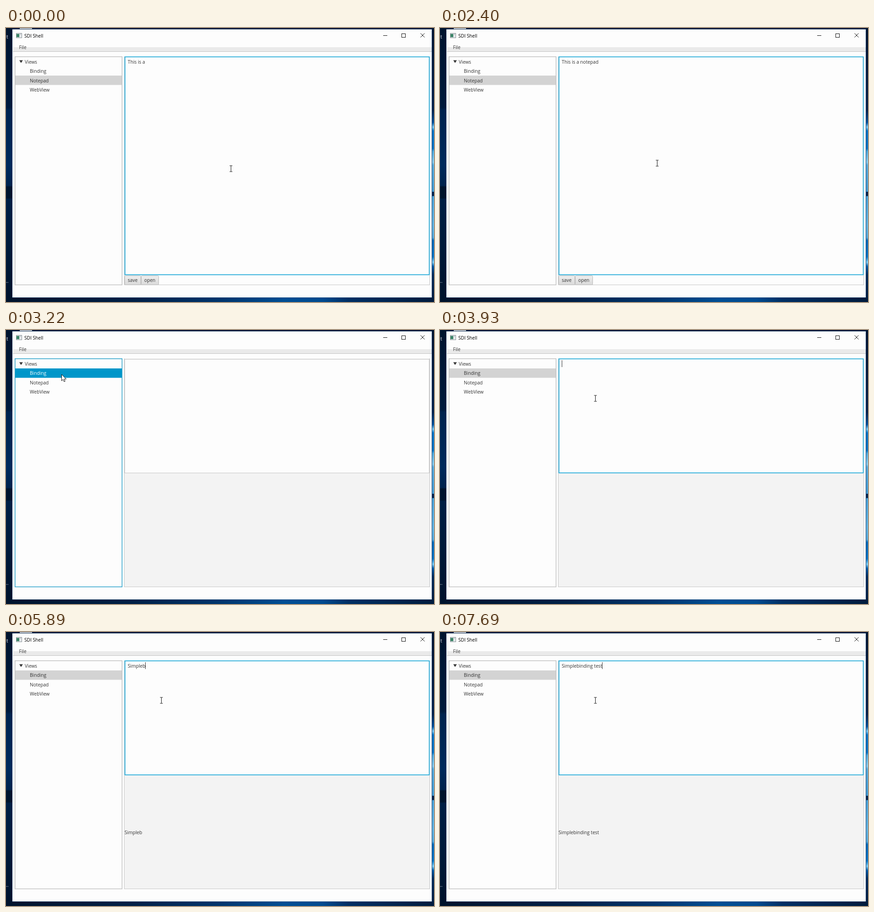
Write an HTML page with a canvas that moves like this. It is 935 px wide and 599 px high and loops after 8000 ms.

```html
<!DOCTYPE html>
<html lang="en">
<head>
<meta charset="utf-8">
<title>SDI Shell</title>
<style>
html, body { margin: 0; width: 100%; height: 100%; overflow: hidden; background: #001a3a; }
canvas { display: block; width: 935px; height: 599px; }
</style>
</head>
<body>
<canvas id="stage"></canvas>
<script>
const W = 935, H = 599, LOOP = 8000;
const FONT = '10.2px "Open Sans", "Noto Sans", sans-serif';
const WHITE = '#fdfdfd', INK = '#333', GREY = '#c6c6c6', ACCENT = '#039ed3';
const canvas = document.getElementById('stage');
const ctx = canvas.getContext('2d');
const dpr = window.devicePixelRatio || 1;
canvas.width = W * dpr;
canvas.height = H * dpr;
ctx.scale(dpr, dpr);

// Each entry: start time, typed text, caret visible
const typing = [
  [0, 'This is a ', false], [150, 'This is a ', true], [580, 'This is a ', false],
  [990, 'This is a ', true], [1140, 'This is a n', true], [1280, 'This is a no', true],
  [1420, 'This is a note', true], [1700, 'This is a notepa', true],
  [1840, 'This is a notepad', true], [2400, 'This is a notepad', false],
  [2820, 'This is a notepad', true], [3220, '', false], [3930, '', true],
  [4460, '', false], [4600, 'Si', true], [4730, 'Sim', true],
  [5010, 'Simpl', true], [5150, 'Simple', true], [5750, 'Simple', false],
  [5890, 'Simpleb', true], [6320, 'Simplebi', true], [6450, 'Simplebin', true],
  [7000, 'Simplebin', false], [7140, 'Simplebind', true], [7280, 'Simplebindin', true],
  [7410, 'Simplebinding', true], [7550, 'Simplebinding te', true],
  [7690, 'Simplebinding test', true]
];

// Each entry: start time, pointer x, y
const pointer = [
  [0, 491, 307], [2400, 474, 295], [2540, 400, 246], [2680, 288, 172],
  [2820, 188, 116], [2960, 132, 100], [3100, 121, 97],
  [3500, 150, 106], [3640, 256, 136], [3780, 339, 149.5]
];

const current = (list, t) => list.filter(e => e[0] <= t).pop();

function rect(x, y, w, h, fill) {
  ctx.fillStyle = fill;
  ctx.fillRect(x, y, w, h);
}

function frame(x, y, w, h, color, line = 1) {
  ctx.strokeStyle = color;
  ctx.lineWidth = line;
  ctx.strokeRect(x, y, w, h);
}

function path(points, close) {
  ctx.beginPath();
  points.forEach(([x, y]) => ctx.lineTo(x, y));
  if (close) ctx.closePath();
}

function lines(color, ...segments) {
  ctx.strokeStyle = color;
  ctx.lineWidth = 1;
  for (const [x1, y1, x2, y2] of segments) {
    path([[x1, y1], [x2, y2]]);
    ctx.stroke();
  }
}

function text(s, x, y, color = INK) {
  ctx.font = FONT;
  ctx.fillStyle = color;
  ctx.fillText(s, x, y);
}

function gradient(x1, y1, x2, y2, stops) {
  const g = ctx.createLinearGradient(x1, y1, x2, y2);
  stops.forEach(([at, color]) => g.addColorStop(at, color));
  return g;
}

function drawDesktop() {
  rect(0, 0, W, H, '#001a3a');
  rect(0, 0, 14, H, gradient(0, 0, 0, H, [
    [0, '#00142e'], [0.29, '#001a3c'], [0.3, '#00234e'], [0.5, '#002a5c'],
    [0.575, '#00234d'], [0.58, '#00142d'], [0.62, '#00142d'], [0.625, '#001f45'],
    [0.8, '#001a3a'], [1, '#00122b']
  ]));
  rect(30, 0, 27, 2, '#c9ccd2');
  rect(0, 589, W, 10, gradient(0, 0, W, 0, [
    [0, '#00132c'], [0.3, '#002047'], [0.5, '#00356d'], [0.65, '#004e94'],
    [0.74, '#004a8f'], [0.8, '#002f64'], [1, '#001b3d']
  ]));
  rect(931, 0, 4, H, gradient(0, 0, 0, H, [
    [0, '#00142f'], [0.3, '#00204a'], [0.345, '#00509c'], [0.362, '#7ccbf5'],
    [0.375, '#0873c4'], [0.44, '#0873c4'], [0.45, '#4fa9dd'], [0.49, '#8acbed'],
    [0.5, '#58aadb'], [0.597, '#459bd2'], [0.598, '#00234d'], [0.613, '#00234d'],
    [0.614, '#4ba2d8'], [0.72, '#64b3e0'], [0.765, '#58aadb'], [0.775, '#0869b7'],
    [0.835, '#0873c4'], [0.855, '#83d0f7'], [0.87, '#005aa8'], [0.9, '#002a5a'],
    [1, '#001a3b']
  ]));
  text('t', 1, 23, '#e8edf4');
  text('..', 0, 557, '#e8edf4');
}

function drawWindow() {
  rect(13.5, 2.5, 917.5, 587, '#14406f');
  rect(14, 3, 916, 586, WHITE);

  rect(22, 11, 13, 11, '#8f979c');
  rect(23, 12, 11, 9, '#e3e7e9');
  rect(23, 13, 6, 7, '#3b8467');
  rect(30, 13, 3, 1, '#9aa2a8');
  text('SDI Shell', 40, 20.5, '#000');

  lines('#111', [824, 16.5, 833, 16.5], [905.5, 11.5, 914.5, 20.5], [914.5, 11.5, 905.5, 20.5]);
  frame(864.5, 12.5, 8, 8, '#111');

  rect(15, 42, 915, 9, '#eaeaea');
  rect(15, 51, 915, 1, '#c2c2c2');
  text('File', 28.5, 45.5);
}

function drawTree(selected, focused) {
  rect(19, 62, 235, 500, WHITE);
  const row = 84 + 20.5 * selected;
  rect(20, Math.floor(row), 233, 20.5, focused ? '#0096c9' : '#d3d3d3');
  frame(19.75, 62.75, 233.75, 498.75, focused ? '#28a1c9' : '#c2c2c2', 1.5);
  ctx.fillStyle = INK;
  path([[29, 70.5], [36.8, 70.5], [32.9, 76.5]], true);
  ctx.fill();
  text('Views', 41, 77.5);
  ['Binding', 'Notepad', 'WebView'].forEach((name, i) =>
    text(name, 52, 98 + 20.5 * i, focused && i === selected ? '#fff' : INK));
}

function drawArea(bottom, focused) {
  rect(259, 62, 666, bottom - 62, WHITE);
  if (focused) {
    frame(259.75, 63, 665, bottom - 63.5, '#8fd3eb', 2);
    frame(260, 63.25, 664.5, bottom - 64, ACCENT, 1.1);
  } else {
    frame(259.5, 63.5, 665, bottom - 64, GREY);
    rect(260, 64, 664, 1, '#e6e6e6');
  }
}

function drawButton(label, x, w, textX) {
  ctx.beginPath();
  ctx.roundRect(x + 0.5, 541.5, w - 1, 20, 2);
  ctx.fillStyle = gradient(0, 541, 0, 562, [[0, '#efefef'], [1, '#d9d9d9']]);
  ctx.fill();
  ctx.strokeStyle = '#b9b9b9';
  ctx.lineWidth = 1;
  ctx.stroke();
  text(label, textX, 554.5);
}

function drawContent(binding, focused, typed, caret) {
  rect(258, 62, 668, 500, binding ? '#f3f3f3' : WHITE);
  frame(258.5, 62.5, 667, 499, GREY);
  drawArea(binding ? 313 : 540, focused);
  text(typed, 266, 77.5);
  if (caret) {
    const x = Math.round(266 + ctx.measureText(typed).width - 0.4);
    rect(x, 66, 1, 15, '#333');
  }
  if (binding) {
    text(typed, 259, 441.5);
  } else {
    drawButton('save', 259, 36, 266);
    drawButton('open', 295, 39, 302);
  }
}

function drawBeam(x, y) {
  lines('#111',
    [x, y - 6, x, y + 6],
    [x - 3, y - 6.5, x + 3, y - 6.5],
    [x - 3, y + 6.5, x + 3, y + 6.5]);
}

function drawArrow(x, y) {
  path([[0, 0], [0, 14], [3.2, 11], [5.4, 16], [7.7, 15], [5.6, 10.2], [10, 10.2]]
    .map(([dx, dy]) => [x + 0.5 + dx, y + dy]), true);
  ctx.fillStyle = '#fff';
  ctx.fill();
  ctx.strokeStyle = '#111';
  ctx.lineWidth = 1;
  ctx.stroke();
}

function draw(t) {
  const binding = t >= 3220;
  const treeFocused = binding && t < 3930;
  const [, typed, caret] = current(typing, t);
  const [, x, y] = current(pointer, t);
  drawDesktop();
  drawWindow();
  drawTree(binding ? 0 : 1, treeFocused);
  drawContent(binding, !treeFocused, typed, caret);
  if (x > 259) drawBeam(Math.floor(x) + 0.5, Math.floor(y) + 0.5);
  else drawArrow(x, y);
}

const start = performance.now();
function tick() {
  draw((performance.now() - start) % LOOP);
  requestAnimationFrame(tick);
}
tick();
</script>
</body>
</html>
```
